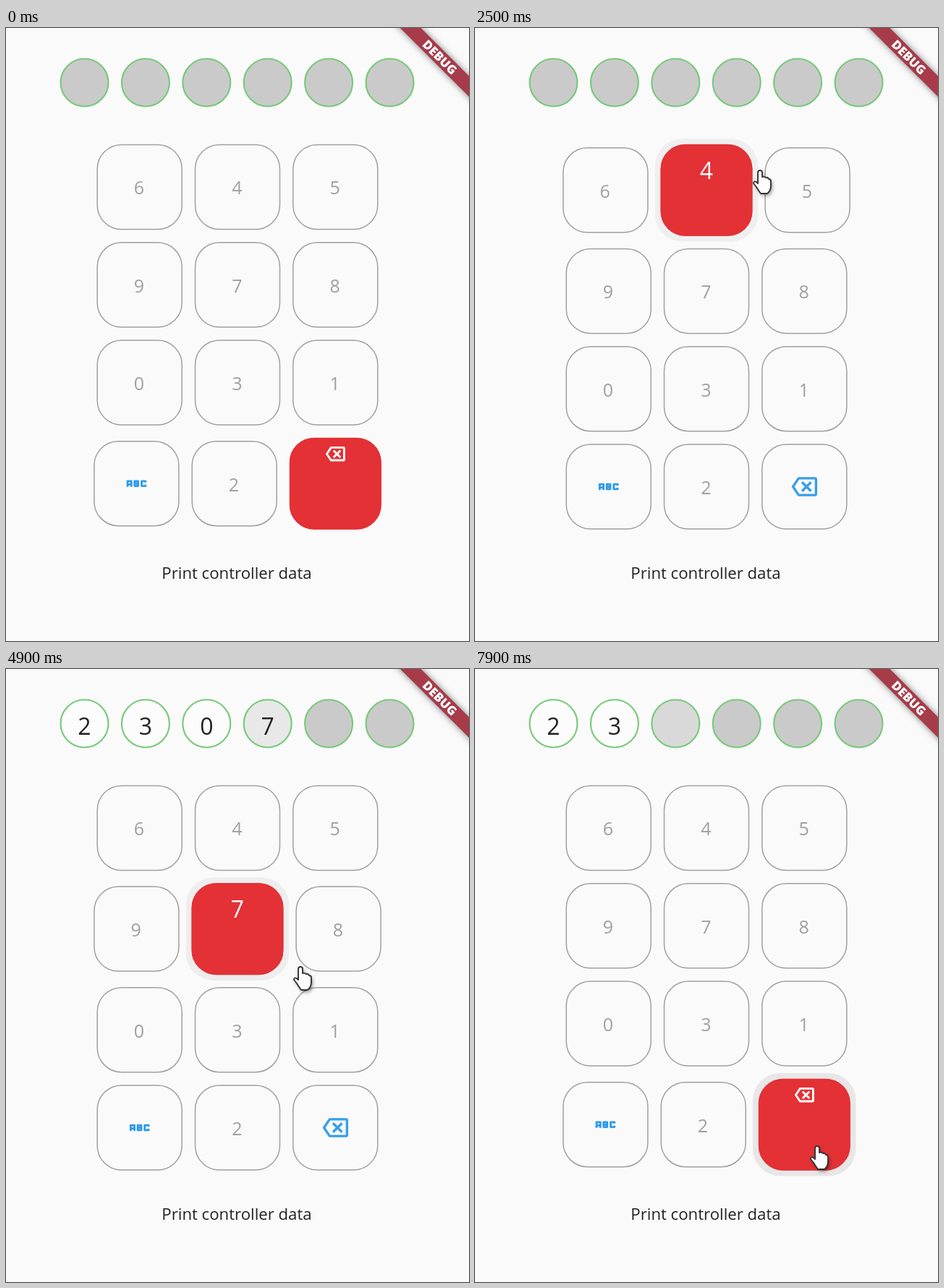
Animation of 640x848 px, one loop 8000 ms. Source, as an HTML page with a canvas:

```html
<!DOCTYPE html>
<html lang="en">
<head>
<meta charset="utf-8">
<title>Keypad</title>
<style>
html, body { margin: 0; width: 100%; height: 100%; overflow: hidden; background: #fafafa; }
canvas { display: block; width: 640px; height: 848px; }
</style>
</head>
<body>
<canvas id="stage" width="640" height="848"></canvas>
<script>
const ctx = document.getElementById('stage').getContext('2d');
const LOOP = 8000, STEP = 100;
const FONT = '"Open Sans", "Noto Sans", sans-serif';
const KEY = 118, GAP = 17.3, GROW = 8.6, TOP = 161;
const GREY = [160, 160, 160], RED = [227, 49, 54];
const ROWS = [['6', '4', '5'], ['9', '7', '8'], ['0', '3', '1'], ['abc', '2', 'del']];

const ABC = new Path2D('M3.75 15V9.75H7.25V15M3.75 12.75H7.25M10.25 9.75H13.5V14.25H10.25ZM10.25 12H13.5M20.25 11V9.75H16.75V14.25H20.25V13');
const DEL = new Path2D('M1.2 12L6.6 4H22Q23 4 23 5V19Q23 20 22 20H6.6ZM9.7 7.7L18.3 16.3M18.3 7.7L9.7 16.3');
const HAND = new Path2D('M-3 3Q-3 0 0 0Q3 0 3 3V9Q6 8 8 10Q11 9 12 12Q15 12 15 15V21Q15 28 10 32H1Q-2 28 -5 23L-9 18Q-9 14 -5 16L-3 18Z');

// [time, key under the pointer]
const HOVER = [
  [-1000, 'del'], [950, '1'], [1250, '3'], [1670, '7'], [1980, '4'], [2540, '5'],
  [2800, '8'], [3000, '1'], [3200, 'del'], [3572, '2'], [3930, '3'], [4250, '0'],
  [4560, '7'], [4920, '8'], [5250, '5'], [5720, '8'], [5846, '1'], [6060, 'del']
];

// [time, key pressed]
const TAPS = [
  [3860, '2'], [4130, '3'], [4430, '0'], [4780, '7'], [5100, '8'], [5420, '5'],
  [6700, 'del'], [7050, 'del'], [7400, 'del'], [7760, 'del'], [7960, 'del']
];

// [time, x, y] of the fingertip
const PATH = [
  [250, 470, 860], [600, 462, 650], [900, 455, 520], [1200, 360, 500], [1450, 352, 490],
  [1700, 350, 424], [1950, 345, 300], [2200, 345, 215], [2500, 394, 197], [2750, 455, 240],
  [3000, 460, 400], [3250, 455, 600], [3450, 440, 650], [3600, 370, 640], [3740, 344, 624],
  [3800, 363, 636], [4050, 320, 510], [4300, 215, 500], [4430, 205, 498], [4600, 300, 400],
  [4780, 340, 370], [4900, 407, 412], [5100, 450, 380], [5300, 460, 240], [5600, 470, 230],
  [5750, 485, 330], [5900, 502, 481], [6150, 485, 640], [6500, 473, 660], [8000, 473, 660]
];

const clamp = v => Math.max(0, Math.min(1, v));
const lerp = (a, b, p) => a + (b - a) * p;
const rgb = (a, b, p) => `rgb(${a.map((v, i) => Math.round(lerp(v, b[i], p))).join()})`;

// Linear run towards 0 or 1, restarted from the current value on each change.
function hoverLevel(key, t, span) {
  let from = 0, target = 0, start = -9999;
  const at = now => lerp(from, target, clamp((now - start) / span));
  for (const [time, name] of HOVER) {
    if (time > t) break;
    const next = name === key ? 1 : 0;
    if (next === target) continue;
    from = at(time);
    target = next;
    start = time;
  }
  return at(t);
}

function hoveredKey(t) {
  return HOVER.filter(h => h[0] <= t).pop()[1];
}

function pointer(t) {
  if (t < PATH[0][0]) return null;
  const i = Math.max(1, PATH.findIndex(p => p[0] >= t));
  const [a, b] = [PATH[i - 1], PATH[i]];
  const p = (t - a[0]) / (b[0] - a[0]);
  return [lerp(a[1], b[1], p), lerp(a[2], b[2], p)];
}

function roundBox(cx, cy, size, r) {
  ctx.beginPath();
  ctx.roundRect(cx - size / 2, cy - size / 2, size, size, r);
}

function text(str, x, y, size, color, weight = 400) {
  ctx.font = `${weight} ${size}px ${FONT}`;
  ctx.textAlign = 'center';
  ctx.fillStyle = color;
  ctx.fillText(str, x, y + size * 0.357);
}

function icon(path, x, y, scale, width, color) {
  ctx.save();
  ctx.translate(x, y);
  ctx.scale(scale, scale);
  ctx.translate(-12, -12);
  ctx.lineWidth = width;
  ctx.lineJoin = 'round';
  ctx.strokeStyle = color;
  ctx.stroke(path);
  ctx.restore();
}

function drawSlots(t) {
  const typed = [];
  const changed = Array(6).fill(-9999);
  for (const [time, key] of TAPS) {
    if (time > t) break;
    if (key === 'del') typed.pop();
    changed[typed.length] = time;
    if (key !== 'del') typed.push(key);
  }
  for (let i = 0; i < 6; i++) {
    const x = 108.5 + 84.4 * i, p = clamp((t - changed[i]) / 200);
    const full = i < typed.length ? p : 1 - p;
    ctx.beginPath();
    ctx.arc(x, 75.5, 33, 0, Math.PI * 2);
    ctx.fillStyle = rgb([202, 202, 202], [252, 252, 252], full);
    ctx.fill();
    ctx.lineWidth = 2.1;
    ctx.strokeStyle = '#76ca79';
    ctx.stroke();
    if (typed[i]) text(typed[i], x, 79.5, 32, '#222');
  }
}

function drawInk(key, x, y, size, t) {
  let shade = t < 500 ? 0 : 0.045 * hoverLevel(key, t, 80);
  let wave = null;
  for (const [time, name] of TAPS) {
    const age = t - time + 110;
    if (name !== key || age < 0 || age > 240) continue;
    const fade = clamp((240 - age) / 120);
    shade += 0.03 * clamp(age / 40) * fade;
    wave = { r: 4 + age * age / 900, alpha: 0.03 * fade, at: pointer(time - 110) };
  }
  if (shade < 0.002) return;
  ctx.save();
  roundBox(x, y, size + 16, 38);
  ctx.fillStyle = `rgba(0,0,0,${shade})`;
  ctx.fill();
  if (wave) {
    ctx.clip();
    ctx.beginPath();
    ctx.arc(wave.at[0], wave.at[1], wave.r, 0, Math.PI * 2);
    ctx.fillStyle = `rgba(0,0,0,${wave.alpha})`;
    ctx.fill();
  }
  ctx.restore();
}

function drawKey(key, x, y, g, t) {
  const size = KEY + GROW * g, active = hoveredKey(t) === key;
  drawInk(key, x, y, size, t);
  roundBox(x, y, size, 34);
  ctx.fillStyle = `rgba(${RED.join()},${g})`;
  ctx.fill();
  roundBox(x, y, size - 1, 33.5);
  ctx.lineWidth = 1.5;
  ctx.strokeStyle = rgb(GREY, RED, g);
  ctx.stroke();

  if (key === 'abc') {
    icon(ABC, x, y, 1.5, 1.9, '#2f9bea');
  } else if (key === 'del') {
    if (active) icon(DEL, x, y - 41 * g, 1.1, 2.6, '#fff');
    else icon(DEL, x, y - 33 * g, 1.46, 2.3, '#379fe9');
  } else if (active) {
    text(key, x, y + 0.5 - 27.5 * g, 32, '#fff', g < 0.5 ? 600 : 500);
  } else {
    text(key, x - 0.7, y + 1.5 - 33 * g, 25, '#a0a0a0');
  }
}

function drawKeypad(t) {
  let top = TOP;
  for (const row of ROWS) {
    const levels = row.map(key => hoverLevel(key, t, 300));
    const total = levels.reduce((a, b) => a + b);
    const height = KEY + GROW * Math.max(...levels);
    let left = 320 - (3 * KEY + 2 * GAP + GROW * total) / 2;
    row.forEach((key, i) => {
      const size = KEY + GROW * levels[i];
      drawKey(key, left + size / 2, top + height / 2, levels[i], t);
      left += size + GAP;
    });
    top += height + GAP;
  }
  text('Print controller data', 319, top + 43, 22.2, '#222');
}

function drawBanner() {
  ctx.save();
  ctx.translate(599.6, 40.4);
  ctx.rotate(Math.PI / 4);
  ctx.shadowColor = 'rgba(0,0,0,.5)';
  ctx.shadowBlur = 10;
  ctx.fillStyle = '#a73b49';
  ctx.fillRect(-100, -10.1, 200, 20.2);
  ctx.shadowColor = 'transparent';
  text('DEBUG', 0, 0, 17.1, '#fff', 800);
  ctx.restore();
}

function drawHand(t) {
  const at = pointer(t);
  if (!at) return;
  ctx.save();
  ctx.translate(at[0], at[1]);
  ctx.shadowColor = 'rgba(0,0,0,.4)';
  ctx.shadowBlur = 5;
  ctx.shadowOffsetX = 2;
  ctx.shadowOffsetY = 3;
  ctx.fillStyle = '#fff';
  ctx.fill(HAND);
  ctx.shadowColor = 'transparent';
  ctx.lineWidth = 1.9;
  ctx.lineJoin = 'round';
  ctx.strokeStyle = '#333';
  ctx.stroke(HAND);
  ctx.restore();
}

function frame() {
  const t = Math.floor(performance.now() % LOOP / STEP) * STEP;
  ctx.fillStyle = '#fafafa';
  ctx.fillRect(0, 0, 640, 848);
  drawSlots(t);
  drawKeypad(t);
  drawBanner();
  drawHand(t);
  requestAnimationFrame(frame);
}
frame();
</script>
</body>
</html>
```
